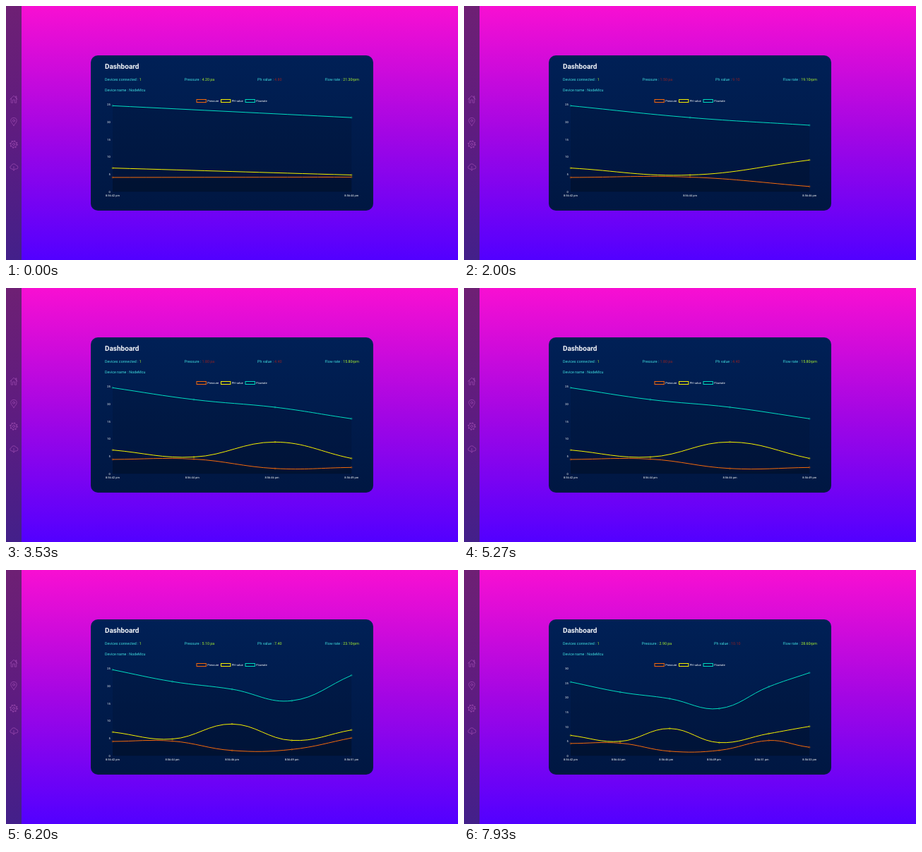
Recreate the animation shown at these times as an HTML page. Size 640x360 px, loop 8000 ms.

```html
<!DOCTYPE html>
<html lang="en">
<head>
<meta charset="utf-8">
<title>Dashboard</title>
<style>
  html, body { margin: 0; width: 100%; height: 100%; overflow: hidden; }
  body {
    position: relative;
    background: linear-gradient(#f80fd2, #a306e4 50%, #5200ff);
    font: 5.333px/6.25px Roboto, sans-serif;
    text-rendering: geometricPrecision;
    color: #40dfe0;
  }
  .side {
    position: absolute; left: 0; top: 0; width: 21.6px; height: 100%;
    background: linear-gradient(#6e2074, #5e1c80 50%, #43208a);
  }
  .card {
    position: absolute; left: 120px; top: 70px; width: 400px; height: 220px;
    border-radius: 10px;
    background: linear-gradient(#002056, #001742);
  }
  h1 {
    position: absolute; left: 140px; top: 81.4px; margin: 0;
    font-size: 10px; line-height: 11.72px; font-weight: 700; color: #f4f6fa;
  }
  .row {
    position: absolute; left: 140px; top: 101.9px; width: 360px;
    display: flex; justify-content: space-between; white-space: pre;
  }
  .device { position: absolute; left: 140px; top: 116.5px; white-space: pre; }
  .good { color: #adf52f; }
  .bad { color: #932222; }
  svg { position: absolute; left: 0; top: 0; }
  svg text { font: 4px Roboto, sans-serif; fill: #fff; }
  .icons { fill: none; stroke: #9a4aae; stroke-width: .75; stroke-linejoin: round; stroke-linecap: round; }
</style>
</head>
<body>
<div class="side"></div>
<div class="card"></div>
<h1>Dashboard</h1>
<div class="row">
  <span>Devices connected : <b class="good" style="font-weight:400">1</b></span>
  <span>Pressure : <span id="pressure"></span></span>
  <span>Ph value : <span id="ph"></span></span>
  <span>Flow rate : <span id="flow"></span></span>
</div>
<div class="device">Device name : NodeMcu</div>
<svg width="640" height="360" viewBox="0 0 640 360">
  <g class="icons">
    <path d="M5.8 132.2 11 127.2 16.2 132.2M7.3 131V137.2H9.6V133H12.4V137.2H14.7V131M13.8 129.7V127.8H14.8V130.7"/>
    <path d="M11 169.5C9.2 166.8 6.8 164.6 6.8 162.5A4.2 4 0 0 1 15.2 162.5C15.2 164.6 12.8 166.8 11 169.5Z"/>
    <circle cx="11" cy="162.6" r="1.5"/>
    <circle cx="11" cy="196" r="4.1"/>
    <circle cx="11" cy="196" r="1.6"/>
    <circle cx="11" cy="196" r="5" stroke-width="1.3" stroke-dasharray="1.6 2.327" stroke-linecap="butt"/>
    <path d="M9 231H8A2.4 2.4 0 0 1 7.6 226.3A3.6 3.6 0 0 1 14.4 226A2.5 2.5 0 0 1 14.4 231H13M11 227.5V233M9.3 231.4 11 233.1 12.7 231.4"/>
  </g>
  <g id="legend"></g>
  <g id="ticks"></g>
  <g id="plot"></g>
</svg>
<script>
const LOOP = 8000, FPS = 15, DURATION = 1000, TENSION = 0.4;
const LEFT = 151, RIGHT = 489.2, TOP = 139.9, BOTTOM = 263.2;

const series = [
  { name: 'Pressure', color: '#f56a0c', data: [4.1, 4.2, 1.5, 1.8, 5.1, 2.9] },
  { name: 'PH value', color: '#f7f000', data: [6.8, 4.8, 9.1, 4.4, 7.4, 10.1] },
  { name: 'Flowrate', color: '#00dcc0', data: [24.7, 21.3, 19.1, 15.8, 23.1, 28.6] }
];
const seconds = [42, 44, 46, 49, 51, 53];

// Each update appends one reading at the given time.
const updates = [
  { at: -1500, count: 2, max: 25 },
  { at: 733, count: 3, max: 25 },
  { at: 2980, count: 4, max: 25 },
  { at: 5280, count: 5, max: 25 },
  { at: 7553, count: 6, max: 30 }
];

const $ = id => document.getElementById(id);

function add(parent, tag, attrs, text) {
  const el = document.createElementNS('http://www.w3.org/2000/svg', tag);
  for (const key in attrs) el.setAttribute(key, attrs[key]);
  if (text !== undefined) el.textContent = text;
  parent.appendChild(el);
  return el;
}

const clamp = (v, lo, hi) => Math.min(hi, Math.max(lo, v));
const easeOutQuart = p => 1 - (1 - p) ** 4;

// Points with spline handles: [x, y, inX, inY, outX, outY].
function layout(data, { count, max }) {
  const pts = data.slice(0, count).map((v, i) => [
    LEFT + (RIGHT - LEFT) * i / (count - 1),
    BOTTOM - (BOTTOM - TOP) * v / max
  ]);
  return pts.map((p, i) => {
    const a = pts[i - 1] || p, b = pts[i + 1] || p;
    const da = Math.hypot(p[0] - a[0], p[1] - a[1]);
    const db = Math.hypot(b[0] - p[0], b[1] - p[1]);
    const handle = k => [
      clamp(p[0] + k * (b[0] - a[0]), LEFT, RIGHT),
      clamp(p[1] + k * (b[1] - a[1]), TOP, BOTTOM)
    ];
    const k = TENSION / (da + db);
    return [...p, ...handle(-k * da), ...handle(k * db)];
  });
}

function blend(from, to, e) {
  return to.map((p, i) => from[i] ? p.map((v, j) => from[i][j] + (v - from[i][j]) * e) : p);
}

function curve(pts) {
  return pts.map((p, i) => {
    if (!i) return `M${p[0]} ${p[1]}`;
    const q = pts[i - 1];
    return `C${q[4]} ${q[5]} ${p[2]} ${p[3]} ${p[0]} ${p[1]}`;
  }).join('');
}

let legendX = 270;
for (const s of series) {
  add($('legend'), 'rect', {
    x: legendX, y: 132.5, width: 13.33, height: 4,
    fill: 'rgba(0,0,0,.1)', stroke: s.color, 'stroke-width': 1
  });
  add($('legend'), 'text', { x: legendX + 15.33, y: 135.9 }, s.name);
  legendX += 34.5;
}

// Later series lie underneath.
for (const s of [...series].reverse()) {
  s.area = add($('plot'), 'path', { fill: 'rgba(0,0,0,.1)' });
  s.line = add($('plot'), 'path', { fill: 'none', stroke: s.color, 'stroke-width': 1 });
  s.dots = s.data.map(() => add($('plot'), 'circle', {
    r: 1, fill: 'rgba(0,0,0,.1)', stroke: s.color, 'stroke-width': .4
  }));
}

function setValue(id, value, unit, good) {
  $(id).textContent = value.toFixed(2) + unit;
  $(id).className = good ? 'good' : 'bad';
}

function showReading({ count, max }) {
  const [pressure, ph, flow] = series.map(s => s.data[count - 1]);
  setValue('pressure', pressure, ' pa', pressure > 2);
  setValue('ph', ph, '', ph > 6 && ph < 9);
  setValue('flow', flow, 'rpm', true);

  const ticks = $('ticks');
  ticks.textContent = '';
  for (let v = 0; v <= max; v += 5) {
    const y = BOTTOM - (BOTTOM - TOP) * v / max;
    add(ticks, 'text', { x: 147.8, y: y + 1.4, 'text-anchor': 'end' }, v);
  }
  for (let i = 0; i < count; i++) {
    const x = LEFT + (RIGHT - LEFT) * i / (count - 1);
    add(ticks, 'text', { x, y: 270.2, 'text-anchor': 'middle' }, `8:56:${seconds[i]} pm`);
  }
}

let shown = -1;

function draw(time) {
  const t = Math.floor((time + 5) * FPS / 1000) * 1000 / FPS;
  const n = updates.filter(u => u.at <= t).length - 1;
  const now = updates[n], before = updates[n - 1] || now;
  if (n !== shown) showReading(now);
  shown = n;

  const e = easeOutQuart(clamp((t - now.at) / DURATION, 0, 1));
  for (const s of series) {
    const pts = blend(layout(s.data, before), layout(s.data, now), e);
    const d = curve(pts);
    s.line.setAttribute('d', d);
    s.area.setAttribute('d', `${d}L${RIGHT} ${BOTTOM}L${LEFT} ${BOTTOM}Z`);
    s.dots.forEach((dot, i) => {
      dot.style.display = pts[i] ? '' : 'none';
      if (!pts[i]) return;
      dot.setAttribute('cx', pts[i][0]);
      dot.setAttribute('cy', pts[i][1]);
    });
  }
}

const start = performance.now();
function tick() {
  draw((performance.now() - start) % LOOP);
  requestAnimationFrame(tick);
}
tick();
</script>
</body>
</html>
```
